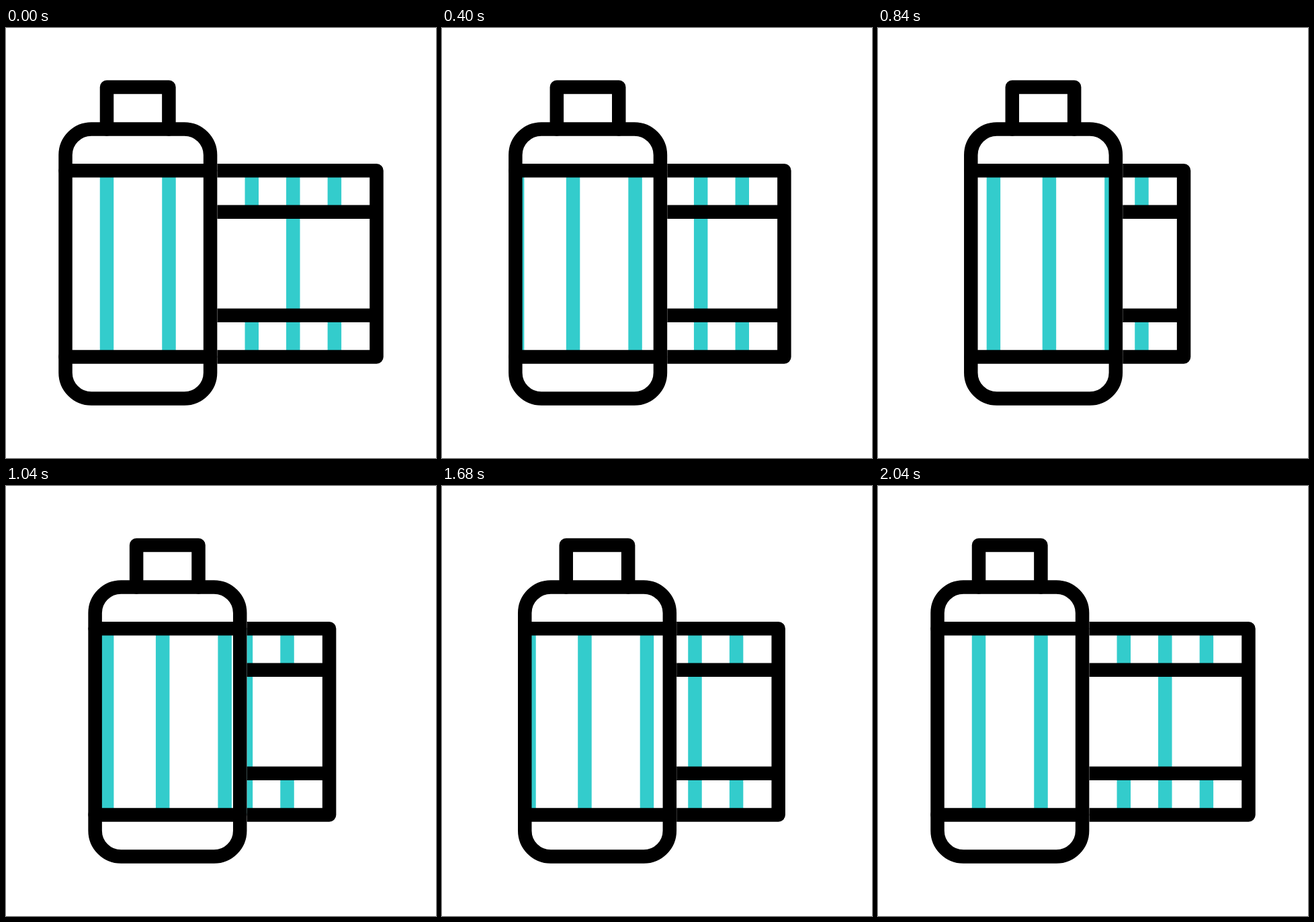
Animation, 640 px wide and 640 px high, one loop 2200 ms. Source, as an HTML page:

```html
<!DOCTYPE html>
<html lang="en">
<head>
<meta charset="utf-8">
<title>Film roll</title>
<style>
  html, body { margin: 0; width: 100%; height: 100%; overflow: hidden; background: #fff; }
  svg { display: block; width: 100%; height: 100%; }
  .ink { fill: none; stroke: #000; stroke-width: 20.5; stroke-linecap: round; stroke-linejoin: round; }
  .teal { fill: none; stroke: #33cccc; stroke-width: 20.5; }
</style>
</head>
<body>
<svg viewBox="0 0 640 640">
  <defs>
    <clipPath id="inside"><rect id="insideBox" x="78.2" y="200" width="236.1" height="300"/></clipPath>
    <clipPath id="outside"><rect id="outsideBox" x="314.5" y="180" width="400" height="340"/></clipPath>
  </defs>
  <g clip-path="url(#outside)">
    <g id="film">
      <path class="teal" d="M365.8 212V274M365.8 428V489M427.3 212V489M488.9 212V274M488.9 428V489"/>
      <path class="ink" d="M150 212.2H551.5V489.4H150M150 273.8H551.5M150 427.8H551.5"/>
    </g>
  </g>
  <g clip-path="url(#inside)">
    <path id="stripes" class="teal" d="M-25.5 212V489M67 212V489M150 212V489M242.5 212V489"/>
  </g>
  <g id="can" class="ink">
    <path d="M150 150.5V88H242.4V150.5"/>
    <rect x="88.5" y="150.5" width="215.6" height="401.1" rx="38.6"/>
    <path d="M88.5 212.2H304.1M88.5 489.4H304.1"/>
  </g>
</svg>
<script>
const LOOP = 2200, TICK = 40;
const $ = id => document.getElementById(id);

// Offsets of each part at rest, fully wound, and half wound
const REST = { can: 0, film: 0, stripes: 0 };
const WOUND = { can: 51.4, film: -103.9, stripes: 111.2 };
const HALF = { can: 42.25, film: -61.8, stripes: 76 };

const moves = [
  { start: 80, end: 640, from: REST, to: WOUND, ease: [0.69, 0.625] },
  { start: 640, end: 1200, from: WOUND, to: HALF, ease: [0.57, 0.58] },
  { start: 1480, end: 2040, from: HALF, to: REST, ease: [0.57, 0.58] }
];

// cubic-bezier(a, 0, b, 1), solved by bisection
function ease(x, [a, b]) {
  let lo = 0, hi = 1;
  for (let i = 0; i < 24; i++) {
    const s = (lo + hi) / 2, r = 1 - s;
    if (3 * r * r * s * a + 3 * r * s * s * b + s * s * s < x) lo = s;
    else hi = s;
  }
  return lo * lo * (3 - 2 * lo);
}

function offset(part, time) {
  const move = moves.findLast(m => time >= m.start);
  if (!move) return 0;
  const x = (time - move.start) / (move.end - move.start);
  const from = move.from[part], to = move.to[part];
  return x >= 1 ? to : from + (to - from) * ease(x, move.ease);
}

function draw(time) {
  const shift = (id, dx) => $(id).setAttribute("transform", `translate(${dx.toFixed(3)} 0)`);
  for (const part of ["can", "film", "stripes"]) shift(part, offset(part, time));
  const can = offset("can", time);
  shift("insideBox", can);
  shift("outsideBox", can);
}

const begin = performance.now();
function loop() {
  const time = (performance.now() - begin) % LOOP;
  draw(Math.floor(time / TICK) * TICK);
  requestAnimationFrame(loop);
}
loop();
</script>
</body>
</html>
```
